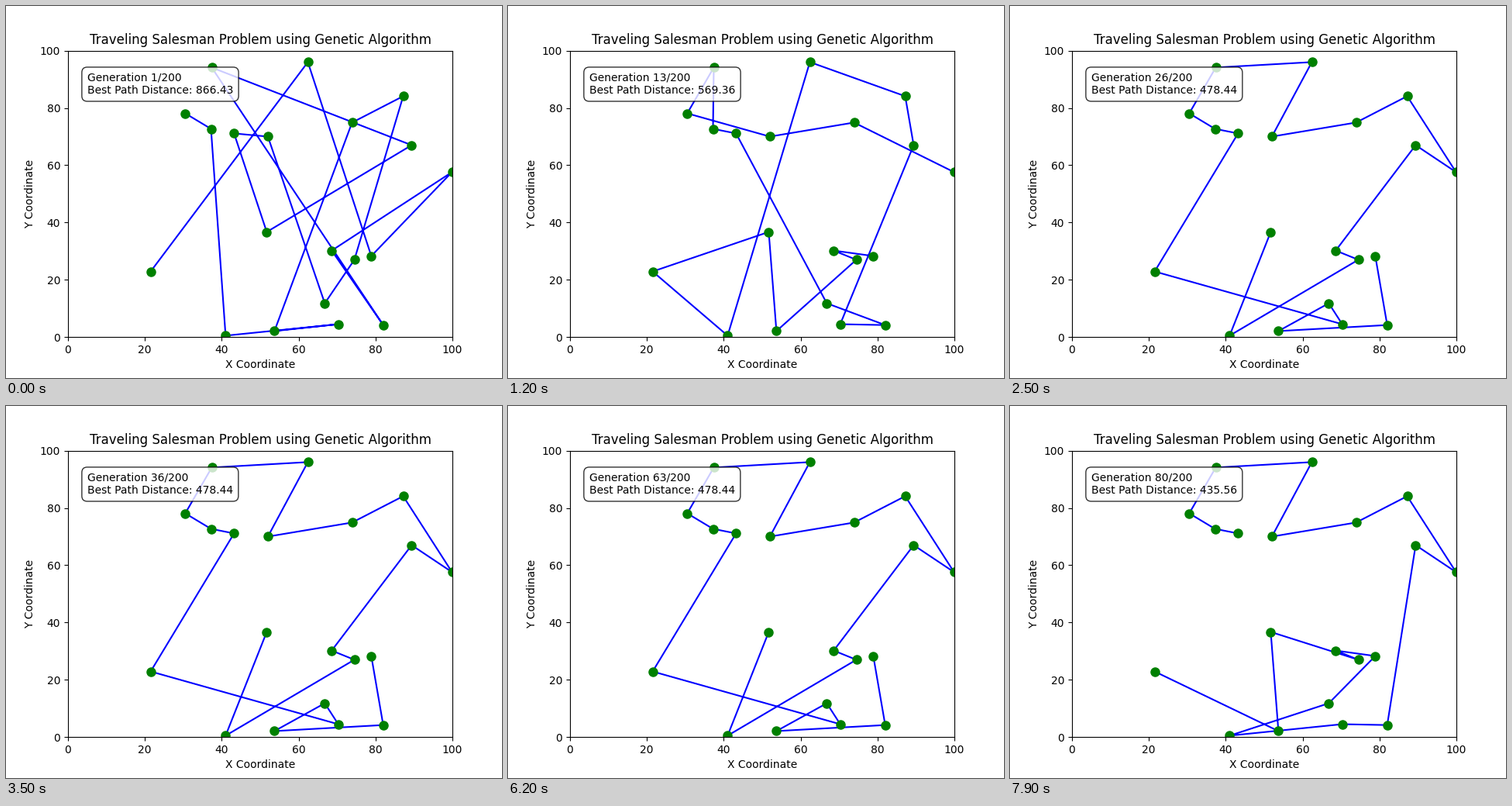
A matplotlib script for the animation above (8000 ms loop, 640x480 px).

```python
import matplotlib.pyplot as plt
import numpy as np
from matplotlib.animation import FuncAnimation

FRAMES = 80
INTERVAL = 100
GENERATIONS = 200

CITIES = dict(
    A=(37.4, 94.1), B=(62.4, 96.0), C=(87.2, 84.1), D=(73.9, 74.9),
    E=(89.4, 67.0), F=(30.5, 78.1), G=(37.2, 72.7), H=(43.2, 71.1),
    I=(52.0, 70.0), J=(99.9, 57.6), K=(51.7, 36.7), L=(68.6, 30.2),
    M=(78.9, 28.3), N=(74.5, 27.0), O=(21.5, 22.9), P=(66.8, 11.8),
    Q=(41.0, 0.5), R=(53.7, 2.1), S=(70.3, 4.5), T=(82.0, 4.2),
)

# First generation of each best route, the route, its length if known exactly
ROUTES = [
    (1, "FGQSRDCNPIHKEATLJMBO", 866.43),
    (3, "FGQSTRDCNPIHKEALJMBO", None),
    (4, "FGQSTRDECNPIHOKALJMB", None),
    (6, "LIGMNRKOQBCESTPHAFDJ", 669.75),
    (9, "IGMLNRKOQBCESTPHAFDJ", None),
    (11, "MLNRKOQBCESTPHGAFIDJ", None),
    (14, "MLNRKOQESTPHGFABIDCJ", None),
    (16, "KQNLEJCDIBAFGHOSPRTM", 478.44),
    (64, "ORKNLMPQSTEJCDIBAFGH", 435.56),
]


def route_points(route):
    return np.array([CITIES[c] for c in route])


def route_length(points):
    return np.hypot(*np.diff(points, axis=0).T).sum()


def best_route(gen):
    _, route, length = [r for r in ROUTES if r[0] <= gen][-1]
    points = route_points(route)
    return points, length or route_length(points)


fig, ax = plt.subplots(figsize=(6.4, 4.8), dpi=100)
ax.set(xlim=(0, 100), ylim=(0, 100),
       xlabel="X Coordinate", ylabel="Y Coordinate",
       title="Traveling Salesman Problem using Genetic Algorithm")

path, = ax.plot([], [], "b-", lw=1.5)
ax.plot(*route_points(CITIES).T, "go", markersize=8)
info = ax.text(5, 85, "", fontsize=10,
               bbox=dict(facecolor="white", alpha=0.8,
                         boxstyle="round,pad=0.5"))


def update(frame):
    gen = frame + 1
    points, length = best_route(gen)
    path.set_data(*points.T)
    info.set_text(f"Generation {gen}/{GENERATIONS}\n"
                  f"Best Path Distance: {length:.2f}")
    return path, info


anim = FuncAnimation(fig, update, frames=FRAMES, interval=INTERVAL,
                     repeat=True, repeat_delay=0)
plt.show()
```
